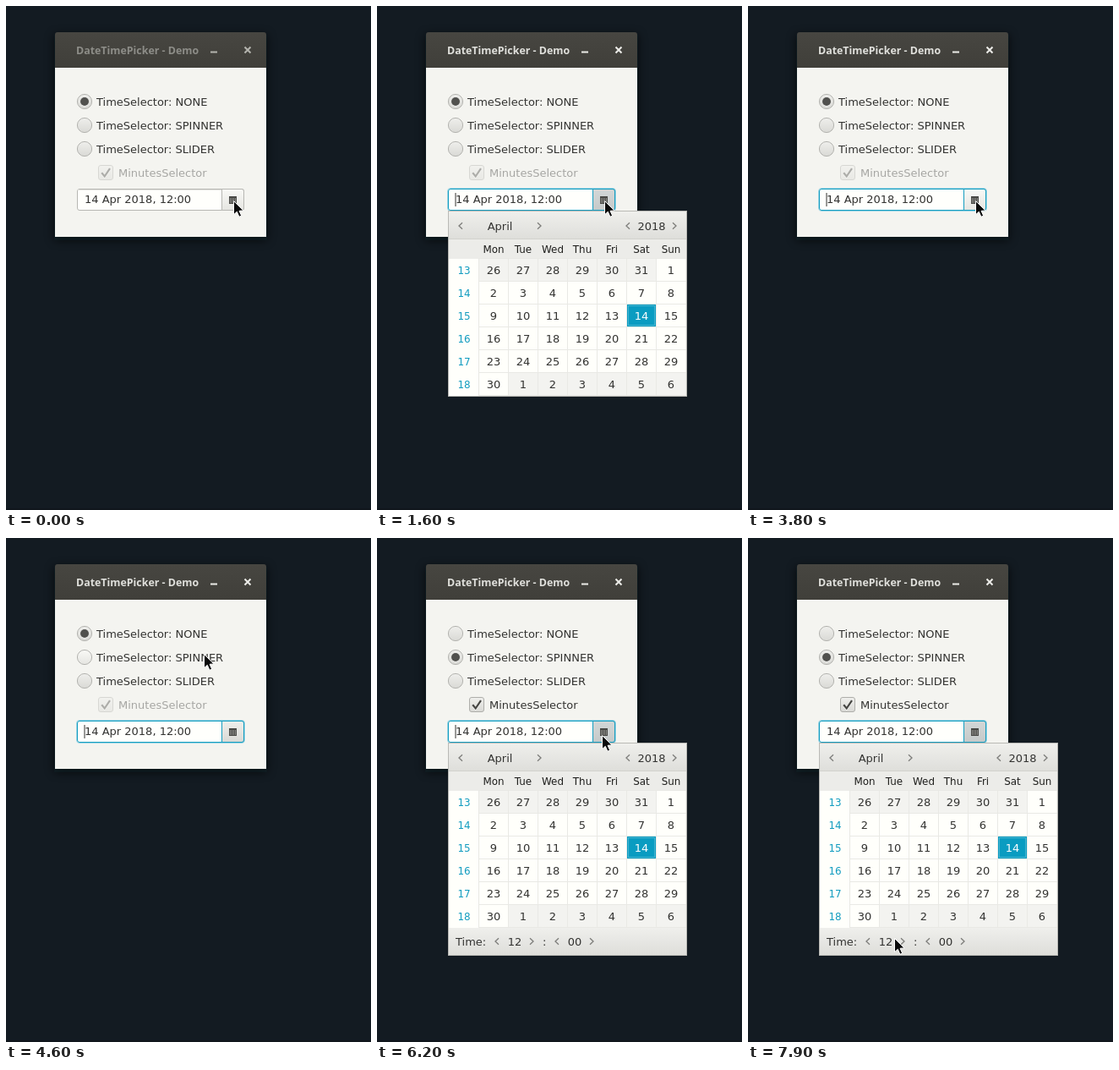
Write an HTML page that moves like this. It is 432 px wide and 596 px high and loops after 8 s.

```html
<!DOCTYPE html>
<html lang="en">
<head>
<meta charset="utf-8">
<title>DateTimePicker demo</title>
<style>
  html, body { margin: 0; width: 100%; height: 100%; overflow: hidden; background: #131b22; }
  svg { display: block; width: 432px; height: 596px; }
  text { font: 13px "DejaVu Sans", sans-serif; fill: #333331; }
  .mid { text-anchor: middle; }
  .small { font-size: 11.92px; }
  .title { font: 700 12.4px "Noto Sans", "Open Sans", sans-serif; }
  .chevron { fill: none; stroke: #7d7d7a; stroke-width: 1.3; }
</style>
</head>
<body>
<svg id="stage" viewBox="0 0 432 596" xmlns="http://www.w3.org/2000/svg">
  <defs>
    <linearGradient id="bar" x2="0" y2="1"><stop stop-color="#474641"/><stop offset="1" stop-color="#403f3a"/></linearGradient>
    <linearGradient id="control" x2="0" y2="1"><stop stop-color="#efefec"/><stop offset="1" stop-color="#d9d9d5"/></linearGradient>
    <linearGradient id="hover" x2="0" y2="1"><stop stop-color="#f9f9f6"/><stop offset="1" stop-color="#e5e5e1"/></linearGradient>
    <linearGradient id="armed" x2="0" y2="1"><stop stop-color="#d3d7d7"/><stop offset="1" stop-color="#c5c9c9"/></linearGradient>
    <linearGradient id="pane" x2="0" y2="1"><stop stop-color="#efefec"/><stop offset="1" stop-color="#dededa"/></linearGradient>
    <filter id="shadow" x="-20%" y="-20%" width="140%" height="140%"><feGaussianBlur stdDeviation="6"/></filter>
  </defs>
</svg>
<script>
const LOOP = 8000;
const TEAL = "#149dc0";
const stage = document.getElementById("stage");

function add(parent, tag, attrs, content) {
  const node = document.createElementNS(stage.namespaceURI, tag);
  for (const key in attrs) node.setAttribute(key, attrs[key]);
  if (content !== undefined) node.textContent = content;
  return parent.appendChild(node);
}
const rect = (parent, x, y, width, height, fill, extra) =>
  add(parent, "rect", { x, y, width, height, fill, ...extra });
const label = (parent, x, y, content, extra) => add(parent, "text", { x, y, ...extra }, content);
const path = (parent, d, extra) => add(parent, "path", { d, ...extra });
const chevron = (parent, x, y, dir) =>
  path(parent, `M${x - 2 * dir} ${y - 3.7}l${4 * dir} 3.7l${-4 * dir} 3.7`, { class: "chevron" });
const show = (node, visible) => node.setAttribute("visibility", visible ? "inherit" : "hidden");

// Desktop and window frame
rect(stage, 0, 0, 432, 596, "#131b22");
rect(stage, 0, 594, 432, 2, "#10161c");
rect(stage, 57, 34, 252, 243, "#05090d", { opacity: 0.65, filter: "url(#shadow)" });
path(stage, "M58 73V34q0-3 3-3H305q3 0 3 3V73Z", { fill: "url(#bar)" });
rect(stage, 58, 73, 250, 200, "#f4f4f0");
const title = label(stage, 83, 57, "DateTimePicker - Demo", { class: "title" });
const minimize = rect(stage, 242, 53.5, 8, 2);
const close = path(stage, "M282.5 48.5l7 7m0-7l-7 7", { "stroke-width": 2 });

// Radio buttons
const radios = ["NONE", "SPINNER", "SLIDER"].map((name, i) => {
  const cy = 113 + 28 * i;
  const circle = (r, fill, extra) => add(stage, "circle", { cx: 93, cy, r, fill, ...extra });
  const glow = circle(9.6, "none", { stroke: "#9bd5e5", "stroke-width": 1.6 });
  const body = circle(8.6, "url(#control)", { "stroke-width": 1 });
  const dot = add(stage, "g", {});
  add(dot, "circle", { cx: 93, cy: cy + 0.8, r: 5, fill: "#fafaf8" });
  add(dot, "circle", { cx: 93, cy, r: 5, fill: "#51514e" });
  label(stage, 107, cy + 5, "TimeSelector: " + name);
  return { glow, body, dot };
});

// Check box
const minutes = add(stage, "g", {});
rect(minutes, 109.5, 188.5, 17, 17, "url(#control)", { rx: 2.5, stroke: "#aeaeaa" });
path(minutes, "M113.2 197.3l3.5 4.2 6.3-9.3", { fill: "none", stroke: "#fafaf8", "stroke-width": 2.2, transform: "translate(0 1)" });
path(minutes, "M113.2 197.3l3.5 4.2 6.3-9.3", { fill: "none", stroke: "#454542", "stroke-width": 2.2 });
label(minutes, 133, 202, "MinutesSelector");

// Date field
const fieldGlow = rect(stage, 83.5, 215.5, 199, 27, "none", { rx: 3.5, stroke: "#9bd5e5" });
const fieldBody = rect(stage, 84.5, 216.5, 197, 25, "#fffffc", { rx: 2.5 });
const innerShade = rect(stage, 85, 217, 170, 1, "#e2e2de");
const button = path(stage, "M255.5 216.5H279q2.5 0 2.5 2.5v20q0 2.5-2.5 2.5H255.5Z", {});
label(stage, 93, 233, "14 Apr 2018, 12:00");
const caret = rect(stage, 92.5, 221, 1, 16, "#333331");
rect(stage, 264, 225, 9, 9, "#484845");
for (let i = 0; i < 12; i++)
  rect(stage, 265 + 2 * (i % 4), 227.5 + 2 * Math.floor(i / 4), 1, 1, "#d2d2ce");

// Calendar popup
const popup = add(stage, "g", {});
rect(popup, 85, 243, 281, 33, "url(#pane)");
rect(popup, 85, 275, 281, 1, "#d2d2ce");
rect(popup, 85, 276, 281, 23, "#ecece9");
rect(popup, 85, 299, 281, 162, "#fffffb");
[[99, -1], [192, 1], [297, -1], [352, 1]].forEach(([x, dir]) => chevron(popup, x, 260, dir));
label(popup, 145.5, 265, "April", { class: "mid" });
label(popup, 325, 265, "2018", { class: "mid" });
["Mon", "Tue", "Wed", "Thu", "Fri", "Sat", "Sun"].forEach((day, i) =>
  label(popup, 138 + 35 * i, 292, day, { class: "mid small", style: "fill:#1d1d1b" }));
for (let i = 0; i < 42; i++) {
  const col = i % 7, row = Math.floor(i / 7);
  const x = 120 + 35 * col, y = 299 + 27 * row;
  const date = new Date(2018, 2, 26 + i);
  const inMonth = date.getMonth() === 3;
  const selected = inMonth && date.getDate() === 14;
  rect(popup, x + 0.5, y - 0.5, col < 6 ? 35 : 45 - 0 - 9.5, 27, inMonth ? "#fffffb" : "#f3f3f0", { stroke: "#e9e9e5" });
  if (selected) {
    rect(popup, x + 1, y, 34, 26, "#0a9cc1");
    rect(popup, x + 2.5, y + 1.5, 31, 23, "none", { stroke: "#45b4d0" });
  }
  label(popup, x + 18, y + 18, date.getDate(), { class: "mid", style: selected ? "fill:#fff" : "" });
  if (!col) label(popup, 103, y + 18, 13 + row, { class: "mid small", style: "fill:" + TEAL });
}
const calendarEdge = rect(popup, 84.5, 242.5, 282, 219, "none", { stroke: "#b9b9b5" });

const timeRow = add(popup, "g", {});
rect(timeRow, 85, 461, 281, 32, "url(#pane)");
rect(timeRow, 84.5, 242.5, 282, 251, "none", { stroke: "#b9b9b5" });
label(timeRow, 93, 482, "Time:");
[[142, -1], [183, 1], [213, -1], [254, 1]].forEach(([x, dir]) => chevron(timeRow, x, 477, dir));
label(timeRow, 163, 482, "12", { class: "mid" });
label(timeRow, 198.3, 482, ":", { class: "mid" });
label(timeRow, 234, 482, "00", { class: "mid" });

const pointer = path(stage, "M0 0V16.2L3.8 12.8 6.4 18.8 9.2 17.6 6.6 11.8 11.6 11.4Z",
  { fill: "#0b0b0b", stroke: "#fff", "stroke-width": 1, "stroke-linejoin": "round" });

// Pointer route: time, x, y
const ROUTE = [
  [0, 269, 230], [4100, 269, 230], [4600, 234, 137], [5000, 234, 137],
  [5600, 266, 233], [7000, 266, 233], [7500, 180, 451], [7600, 180, 451], [7900, 173, 473]
];

function pointerAt(t) {
  const next = ROUTE.findIndex(key => key[0] > t);
  if (next < 0) return ROUTE[ROUTE.length - 1].slice(1);
  const [t0, x0, y0] = ROUTE[next - 1], [t1, x1, y1] = ROUTE[next];
  const p = (t - t0) / (t1 - t0), e = p * p * (3 - 2 * p);
  return [x0 + (x1 - x0) * e, y0 + (y1 - y0) * e];
}

const within = (t, ...spans) => spans.some(([from, to]) => t >= from && t < to);

function render(ms) {
  const t = Math.floor(ms / 100) * 100;
  const [x, y] = pointerAt(t);
  pointer.setAttribute("transform", `translate(${Math.round(x) + 0.5} ${Math.round(y) + 0.5})`);

  const active = t >= 1500;
  title.style.fill = active ? "#e0e0dc" : "#8d8d88";
  minimize.setAttribute("fill", active ? "#ecece8" : "#b4b4ae");
  close.setAttribute("stroke", active ? "#ecece8" : "#b4b4ae");

  const chosen = t < 4900 ? 0 : 1;
  radios.forEach(({ glow, body, dot }, i) => {
    const focused = i === 1 && within(t, [4700, 6200]);
    const hovered = x >= 84 && x <= 258 && Math.abs(y - 113 - 28 * i) < 9;
    show(glow, focused);
    show(dot, i === chosen);
    body.setAttribute("stroke", focused ? TEAL : "#b3b3af");
    body.setAttribute("fill", hovered ? "url(#hover)" : "url(#control)");
  });
  minutes.setAttribute("opacity", chosen ? 1 : 0.4);

  const focused = within(t, [1500, 4700], [6200, LOOP]);
  const open = within(t, [1600, 3800], [6200, LOOP]);
  const overButton = x >= 256 && x <= 282 && y >= 216 && y <= 242;
  const edge = focused ? TEAL : "#b7b7b3";
  show(fieldGlow, focused);
  show(innerShade, !focused);
  fieldBody.setAttribute("stroke", edge);
  button.setAttribute("stroke", edge);
  button.setAttribute("fill", `url(#${open || t === 1500 ? "armed" : overButton ? "hover" : "control"})`);
  show(caret, within(t, [1500, 2300], [3500, 4000], [4500, 4700], [6200, 6600], [7100, 7700]));

  show(popup, open);
  show(timeRow, t >= 6200);
  show(calendarEdge, t < 6200);
}

function tick(now) {
  render(now % LOOP);
  requestAnimationFrame(tick);
}
render(0);
requestAnimationFrame(tick);
</script>
</body>
</html>
```
